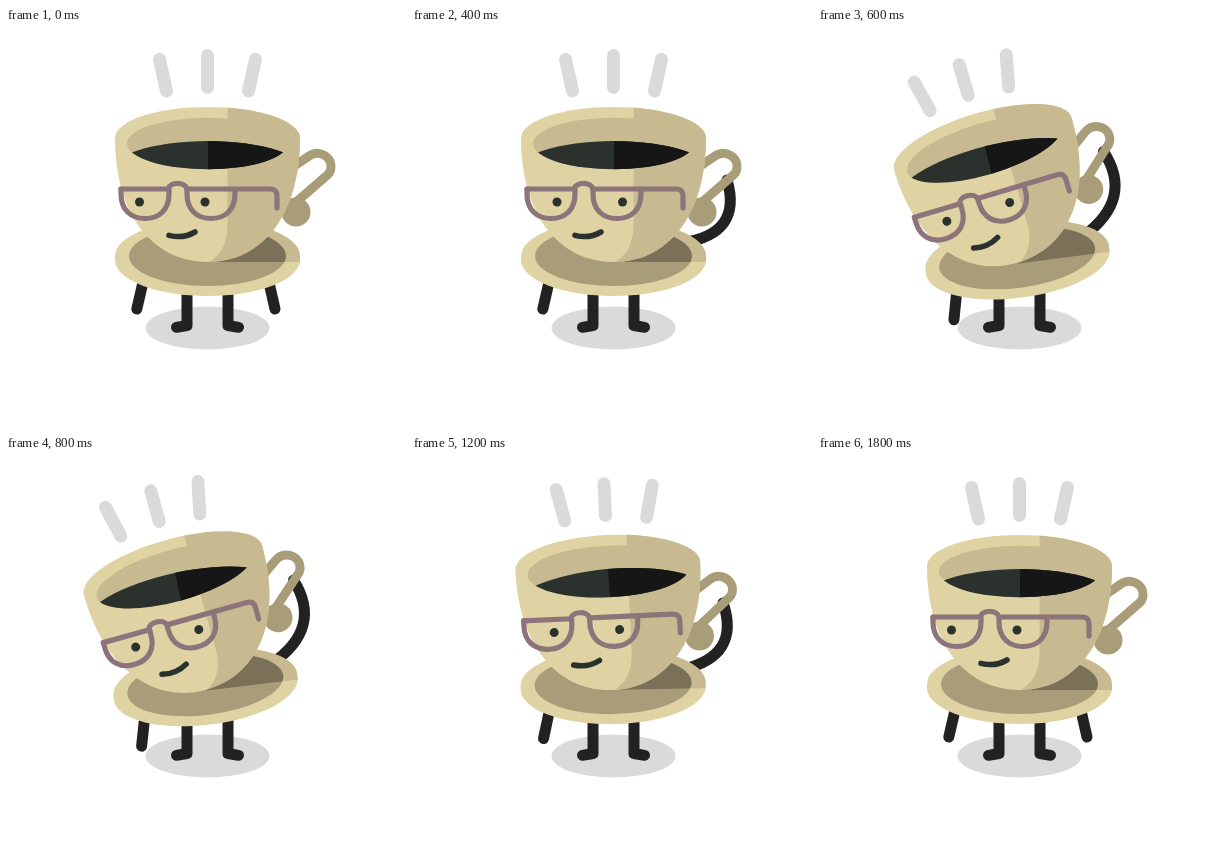
Animation of 400x400 px, one loop 2200 ms. Source, as an HTML page with a canvas:

```html
<!DOCTYPE html>
<html lang="en">
<head>
<meta charset="utf-8">
<title>Coffee cup</title>
<style>
  html, body { margin: 0; width: 100%; height: 100%; overflow: hidden; background: #fff; }
  canvas { display: block; width: 400px; height: 400px; }
</style>
</head>
<body>
<canvas id="stage"></canvas>
<script>
const LOOP = 2200, STEP = 100, CX = 201.5, TAU = Math.PI * 2;
const GRAB = 400, LEAN = 600, RELEASE = 1100, REST = 1800;
const CUP_PIVOT = [194, 231], SAUCER_PIVOT = [CX, 246];
const C = {
  light: '#dfd2a3', shade: '#c8ba90', tan: '#a99c78', deep: '#7b7158',
  grey: '#dadada', limb: '#222222', ink: '#2b312d', black: '#161616', glasses: '#8c747a'
};

const canvas = document.getElementById('stage');
const ratio = window.devicePixelRatio || 1;
canvas.width = canvas.height = 400 * ratio;
const ctx = canvas.getContext('2d');
ctx.lineCap = ctx.lineJoin = 'round';

const mix = (a, b, k) => a + (b - a) * k;
const progress = (t, from, to) => Math.min(1, Math.max(0, (t - from) / (to - from)));
const smooth = (t, from, to) => {
  const k = progress(t, from, to);
  return k * k * (3 - 2 * k);
};

function poseAt(t) {
  const held = 16.6 - 0.005 * Math.max(0, t - LEAN);
  const tilt = held * smooth(t, GRAB, LEAN) * (1 - progress(t, RELEASE, RELEASE + 200)) ** 2.4;
  // The jerk of the lean dies away quickly; the coffee swings on after the release.
  const jerk = t > GRAB ? 3 * Math.exp((GRAB + STEP - t) / 100) : 0;
  const swingStart = RELEASE + 50;
  const swing = t > swingStart
    ? 8.5 * Math.sin(Math.PI * (t - swingStart) / 400) * (1 - progress(t, swingStart, REST))
    : 0;
  return {
    tilt,
    drop: jerk + tilt * 0.04,
    slosh: jerk * 1.3 - tilt * 0.23 + swing,
    gaze: 11.5 * (smooth(t, 0, GRAB) - smooth(t, 1200, 1400)),
    reach: 2 * (progress(t, 0, GRAB) - smooth(t, 1200, 1600))
  };
}

function fill(path, color) {
  ctx.fillStyle = color;
  ctx.fill(new Path2D(path));
}

function stroke(path, color, width) {
  ctx.strokeStyle = color;
  ctx.lineWidth = width;
  ctx.stroke(new Path2D(path));
}

function ellipse(x, y, rx, ry, color, from = 0, to = TAU) {
  ctx.beginPath();
  ctx.ellipse(x, y, rx, ry, 0, from, to);
  ctx.fillStyle = color;
  ctx.fill();
}

function group(draw) {
  ctx.save();
  draw();
  ctx.restore();
}

function turn(degrees, [x, y]) {
  ctx.translate(x, y);
  ctx.rotate(-degrees * Math.PI / 180);
  ctx.translate(-x, -y);
}

function turnPoint([x, y], degrees, [px, py]) {
  const a = degrees * Math.PI / 180, dx = x - px, dy = y - py;
  return [px + dx * Math.cos(a) + dy * Math.sin(a), py - dx * Math.sin(a) + dy * Math.cos(a)];
}

function drawLegs() {
  ellipse(CX, 300, 62, 21.5, C.grey);
  stroke('M181 255V297.5L170.5 299.3', C.limb, 11);
  stroke('M222 255V297.5L232.5 299.3', C.limb, 11);
}

// Shoulder, elbow and hand: hanging, stretched out, holding the handle.
const armPoses = [
  [[259, 237], [264, 259], [269, 281]],
  [[268, 227], [302, 226], [322, 211]],
  [[270, 215], [331, 206], [315, 152]]
];

// The shoulder stays on the saucer; elbow and hand follow the cup.
function drawArm(reach, cupTilt) {
  const i = Math.min(1, Math.floor(reach));
  const [shoulder, elbow, hand] = armPoses[i].map((point, joint) =>
    point.map((v, axis) => mix(v, armPoses[i + 1][joint][axis], reach - i)));
  const bend = [elbow, hand].map(p => turnPoint(p, cupTilt, CUP_PIVOT));
  stroke(`M${shoulder}Q${bend}`, C.limb, 11);
}

function drawSaucer() {
  const outline = 'M109 228A92.5 36 0 0 1 294 228V232A92.5 36 0 0 1 109 232Z';
  const well = 'M123 228A78.5 30 0 0 1 280 228A78.5 30 0 0 1 123 228Z';
  fill(outline, C.light);
  fill(well, C.tan);
  group(() => {
    ctx.beginPath();
    ctx.rect(CX, 180, 100, 54);
    ctx.clip();
    fill(outline, C.shade);
    fill(well, C.deep);
  });
}

function drawHandle() {
  stroke('M284 141L303 128C313 121 326 129 325 139C325 143 322 147 319 149L288 176', C.tan, 9);
  ellipse(290, 184, 14.5, 14.5, C.tan);
}

function drawCoffee(slosh) {
  group(() => {
    ctx.beginPath();
    ctx.ellipse(CX, 115.5, 80.5, 25.8, 0, 0, TAU);
    ctx.clip();
    turn(slosh, [CX, 128]);
    ellipse(CX, 146, 100, 33, C.ink);
    ellipse(CX + 0.5, 146, 100, 33, C.black, -TAU / 4, TAU / 4);
  });
}

function drawCup(slosh) {
  const body = new Path2D('M109 110A92.5 31 0 0 1 294 110C294 187 256 234 201.5 234C147 234 109 187 109 110Z');
  ctx.fillStyle = C.light;
  ctx.fill(body);
  group(() => {
    ctx.clip(body);
    fill('M221.5 70V197C221.5 215 215 228 201 235H300V70Z', C.shade);
  });
  ellipse(CX, 115.5, 80.5, 25.8, C.shade);
  drawCoffee(slosh);
}

function drawFace(gaze) {
  for (const x of [133.5, 199]) ellipse(x + gaze, 174, 4.5, 4.5, C.ink);
  stroke('M163 207.3Q177 211 189 204', C.ink, 5.5);
  for (const x of [115, 181]) {
    stroke(`M${x} 161v5c0 16 10 24.5 24 24.5s24 -8.5 24 -24.5v-5`, C.glasses, 5.2);
  }
  stroke('M115 161H162C164 153.5 179 153.5 181 161H264Q271 161 271 168V180', C.glasses, 5.2);
}

function drawSteam() {
  for (const side of [-1, 0, 1]) {
    const lift = side ? 0 : 3.7;
    stroke(`M${CX + side * 48} ${31.3 - lift}L${CX + side * 41} ${63 - lift}`, C.grey, 13);
  }
}

function draw(t) {
  const { tilt, drop, slosh, gaze, reach } = poseAt(t);
  const saucerTilt = tilt * 0.45, cupTilt = tilt - saucerTilt;

  ctx.setTransform(ratio, 0, 0, ratio, 0, 0);
  ctx.fillStyle = '#fff';
  ctx.fillRect(0, 0, 400, 400);
  drawLegs();

  group(() => {
    ctx.translate(0, drop);
    turn(saucerTilt, SAUCER_PIVOT);
    stroke('M141 237L130.8 281', C.limb, 11);
    drawArm(reach, cupTilt);
    drawSaucer();
    turn(cupTilt, CUP_PIVOT);
    drawSteam();
    drawHandle();
    drawCup(slosh);
    drawFace(gaze);
  });
}

const start = performance.now();

function tick() {
  const t = (performance.now() - start) % LOOP;
  draw(Math.floor(t / STEP) * STEP);
  requestAnimationFrame(tick);
}

tick();
</script>
</body>
</html>
```
